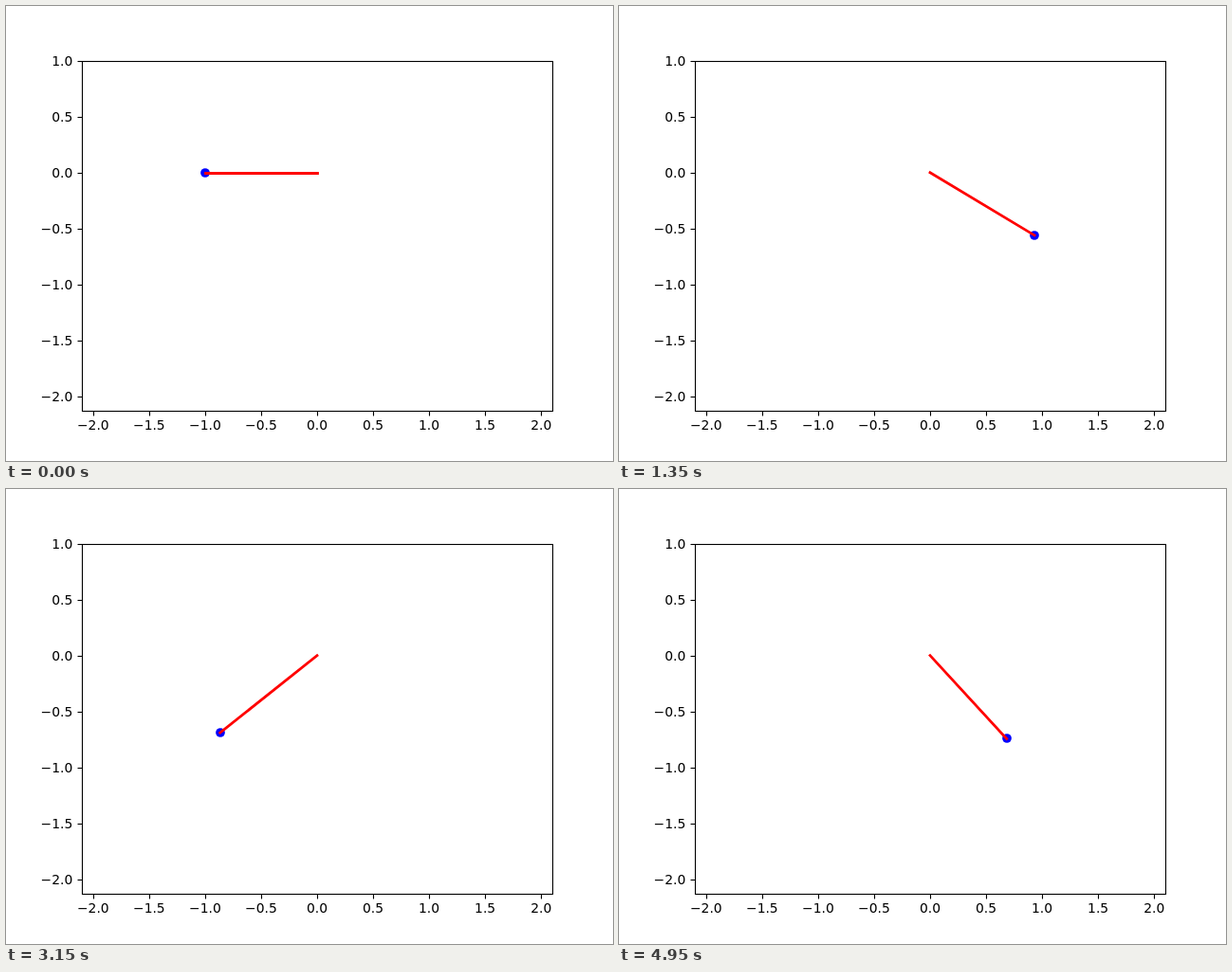
These frames come from a looping animation (640x480 px, 5000 ms). An HTML page:

```html
<!DOCTYPE html>
<html lang="en">
<head>
<meta charset="utf-8">
<title>Spring pendulum</title>
<style>
  html, body { margin: 0; width: 100%; height: 100%; overflow: hidden; background: #fff; }
  svg { display: block; width: 640px; height: 480px; }
  text { font: 13.889px "DejaVu Sans", sans-serif; fill: #000; }
  .axis { fill: none; stroke: #000; stroke-width: 1.11; }
</style>
</head>
<body>
<svg viewBox="0 0 640 480">
  <rect width="640" height="480" fill="#fff"/>
  <circle id="bob" r="4.86" fill="#00f"/>
  <line id="rod" stroke="#f00" stroke-width="2.778" stroke-linecap="square"/>
  <g id="axes"><rect class="axis" x="80.5" y="58.5" width="496" height="369"/></g>
</svg>
<script>
const NS = 'http://www.w3.org/2000/svg';
const axes = document.getElementById('axes');
const bob = document.getElementById('bob');
const rod = document.getElementById('rod');

const SCALE = 496 / 4.2;
const px = x => 328 + SCALE * x;
const py = y => 57.6 + SCALE * (1 - y);

function set(el, attrs) {
  for (const name in attrs) el.setAttribute(name, attrs[name]);
  return el;
}

function add(tag, attrs, text = '') {
  const el = set(document.createElementNS(NS, tag), attrs);
  el.textContent = text;
  axes.appendChild(el);
}

const label = v => v.toFixed(1).replace('-', '\u2212');

function drawTicks() {
  for (let v = -2; v <= 2; v += 0.5) {
    const x = Math.round(px(v));
    add('path', { class: 'axis', d: `M${x + 0.5} 427.5v5` });
    add('text', { x: px(v), y: 447, 'text-anchor': 'middle' }, label(v));
  }
  for (let v = -2; v <= 1; v += 0.5) {
    const y = Math.round(py(v));
    add('path', { class: 'axis', d: `M80.5 ${y + 0.5}h-5` });
    add('text', { x: 70.3, y: y + 5, 'text-anchor': 'end' }, label(v));
  }
}

// Mass on a stiff spring: unit mass, gravity and rest length.
const STIFFNESS = 100;
const FRAMES = 100, FRAME_MS = 50;
const SUBSTEPS = 100, DT = 0.1 / SUBSTEPS;

function accel(x, y) {
  const r = Math.hypot(x, y);
  const pull = -STIFFNESS * (r - 1) / r;
  return [pull * x, pull * y - 1];
}

function simulate() {
  let x = -1, y = 0, vx = -1, vy = 0;
  let [ax, ay] = accel(x, y);
  const path = [];
  for (let i = 0; i < FRAMES; i++) {
    path.push([x, y]);
    for (let j = 0; j < SUBSTEPS; j++) {
      vx += ax * DT / 2;
      vy += ay * DT / 2;
      x += vx * DT;
      y += vy * DT;
      [ax, ay] = accel(x, y);
      vx += ax * DT / 2;
      vy += ay * DT / 2;
    }
  }
  return path;
}

const path = simulate();

function render(ms) {
  const [x, y] = path[Math.floor(ms / FRAME_MS) % FRAMES];
  const cx = px(x), cy = py(y);
  set(bob, { cx: Math.round(cx), cy: Math.round(cy) });
  // A level rod sits on whole pixels.
  const snap = v => y === 0 ? Math.round(v) + 0.5 : v;
  set(rod, { x1: snap(px(0)), y1: snap(py(0)), x2: snap(cx), y2: snap(cy) });
}

function tick() {
  render(performance.now());
  requestAnimationFrame(tick);
}

drawTicks();
tick();
</script>
</body>
</html>
```
